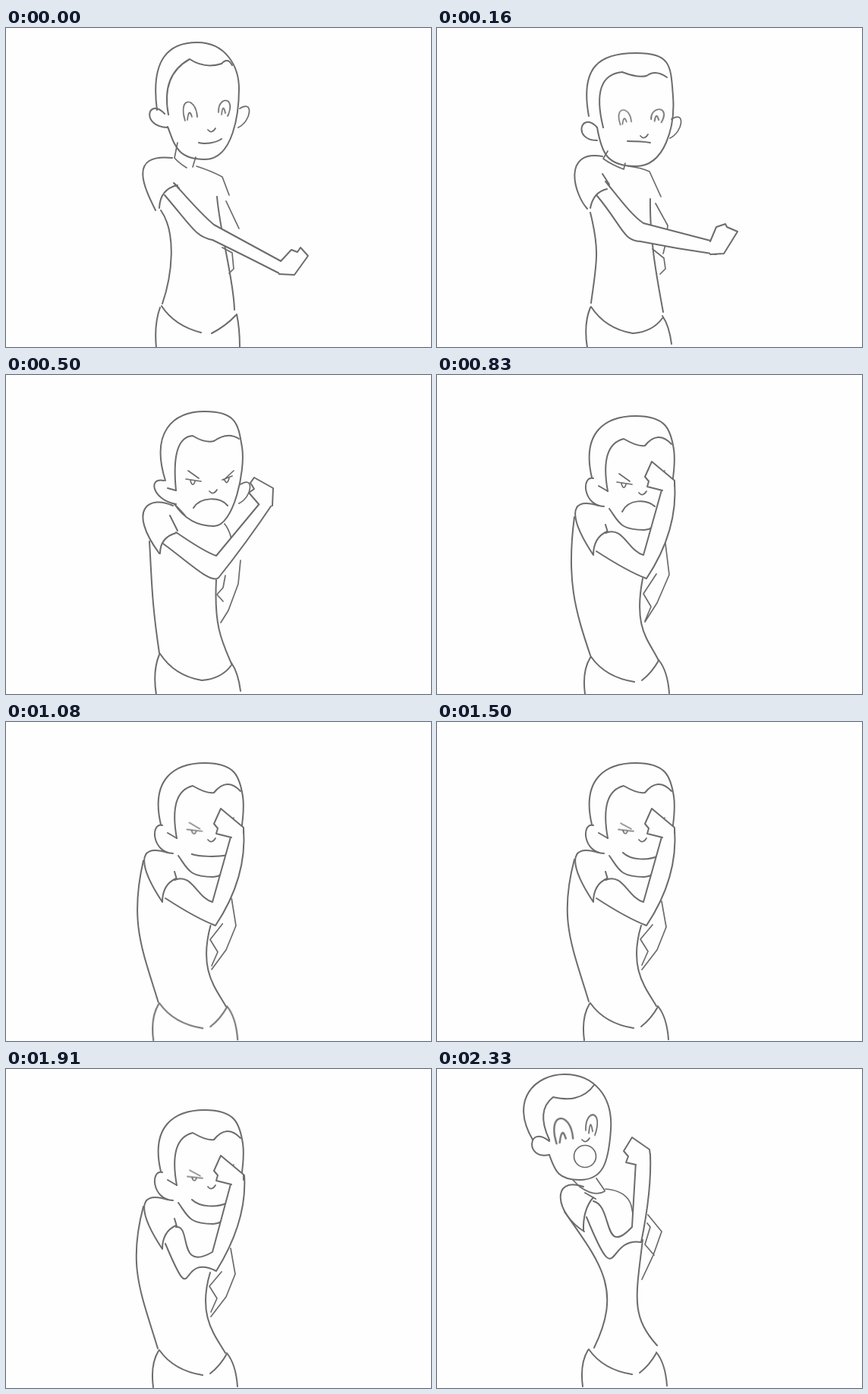
These frames come from a looping animation (560x420 px, 2750 ms). An HTML page without scripts:

```html
<!DOCTYPE html>
<html lang="en">
<head>
<meta charset="utf-8">
<title>Flexing boy</title>
<style>
html, body { margin: 0; width: 100%; height: 100%; overflow: hidden; background: #fefefe; }
svg { display: block; width: 560px; height: 420px; }
path, circle { fill: none; stroke: #6c6c6c; stroke-width: 2; stroke-linecap: round; stroke-linejoin: round; }
.move { animation: 2750ms steps(4) infinite; }
.thin, .thin path { stroke-width: 1.7; }
.solid { fill: #fefefe; }
.eye { transform-box: fill-box; transform-origin: center; }
#head { animation-name: head; }
#hair { animation-name: hair; }
#ear { animation-name: ear; }
#farEar { animation-name: farEar; }
#openL { animation-name: openL, openShow; }
#openR { animation-name: openR, openShow; }
#angryL { animation-name: angryL, angryShow; }
#angryR { animation-name: angryShow; }
#nose { animation-name: nose; }
#mouth { animation-name: mouth, mouthShow; }
#gasp { animation-name: gasp; }
#neck { animation-name: neck, neckShow; }
#sleeve { animation-name: sleeve; }
#torso { animation-name: torso; }
#hips { animation-name: hips; }
#back { animation-name: back; }
#arm { animation-name: arm; }
#fist { animation-name: fist; }

@keyframes head {
  0% { animation-timing-function: steps(2); d: path("M199 108C190 40 215 19 252 19S307 50 307 80S300 173 262 173S222 152 213 130"); }
  5.75% { d: path("M200 116C188 50 215 33 262 33S308 50 311 90S300 182 262 182S217 165 211 131"); }
  18.1% { d: path("M210 139C190 75 220 48 262 48S306 65 311 95S300 199 274 199S232 185 222 170"); }
  30.1%, 81.75% { animation-timing-function: steps(1, jump-both); d: path("M204 135C190 75 222 54 262 54S308 72 312 98S305 204 273 204S240 194 227 176"); }
  84.65%, to { d: path("M126 93C95 40 130 7 168 7S232 35 229 80S218 146 188 146S155 132 148 113"); }
}
@keyframes hair {
  0% { animation-timing-function: steps(2); d: path("M214 114Q204 62 242 41Q262 54 284 47Q292 38 298 49"); }
  5.75% { d: path("M219 131Q202 62 244 58Q265 66 276 63Q288 54 303 65"); }
  18.1% { d: path("M224 152Q217 82 246 80Q262 90 274 87Q292 74 307 84"); }
  30.1%, 81.75% { animation-timing-function: steps(1, jump-both); d: path("M225 153Q214 92 246 84Q265 95 274 93Q291 72 309 91"); }
  84.65%, to { d: path("M148 93Q130 55 153 37Q172 41 182 38Q198 34 207 21"); }
}
/* Near ear and sideburn */
@keyframes ear {
  0% { animation-timing-function: steps(2); d: path("M209 113C187 90 177 130 213 131M214 114L214 114"); }
  5.75% { d: path("M211 131C190 108 178 148 211 148M219 131L219 131"); }
  18.1% { d: path("M208 139C187 134 192 164 224 170M213 149L224 152"); }
  30.1%, 81.75% { animation-timing-function: steps(1, jump-both); d: path("M206 136C190 132 192 172 220 173M213 146L225 153"); }
  84.65%, to { d: path("M148 95C120 72 115 120 148 113M148 93L148 93"); }
}
@keyframes farEar {
  0% { animation-timing-function: steps(2); transform: none; }
  5.75% { transform: translate(1px, 14px); }
  18.1% { transform: translate(1px, 38px); opacity: 1; }
  22%, to { transform: translate(-6px, 42px); opacity: 0; }
}

@keyframes openL {
  0% { animation-timing-function: steps(2); transform: none; }
  5.75%, 81.75% { animation-timing-function: steps(1, jump-both); transform: translate(5px, 8px) scale(.9, .8); }
  84.65%, to { transform: translate(-76px, -28px) scale(1.35); }
}
@keyframes openR {
  0% { animation-timing-function: steps(2); transform: none; }
  5.75%, 81.75% { animation-timing-function: steps(1, jump-both); transform: translate(3px, 10px) scale(1.1, .85); }
  84.65%, to { transform: translate(-84px, -32px) scale(1, 1.3); }
}
@keyframes openShow {
  0%, 12% { opacity: 1; }
  12.01%, 81.74% { opacity: 0; }
  81.75%, to { opacity: 1; }
}
@keyframes angryL {
  0%, 18.1% { transform: none; }
  30.1% { transform: translate(0, 4px); }
  42.1%, to { transform: translate(2px, 5px) scale(1, .75); }
}
@keyframes angryShow {
  0%, 12% { opacity: 0; }
  12.01%, 81.74% { opacity: 1; }
  81.75%, to { opacity: 0; }
}
@keyframes nose {
  0% { animation-timing-function: steps(2); transform: none; }
  5.75% { transform: translate(2px, 8px); }
  18.1% { transform: translate(2px, 19px); }
  30.1%, 81.75% { animation-timing-function: steps(1, jump-both); transform: translate(0, 21px); }
  84.65%, to { transform: translate(-75px, -41px); }
}
@keyframes mouth {
  0% { animation-timing-function: steps(2); d: path("M254 151C262 153 275 152 284 146"); }
  5.75% { d: path("M251 149C262 149 270 149 281 151"); }
  18.1% { d: path("M247 175C256 160 282 160 292 172"); }
  30.1% { d: path("M244 180C252 163 276 163 287 173"); }
  42.1%, to { d: path("M245 172C255 182 278 183 292 176"); }
}
@keyframes mouthShow {
  0%, 81.75% { animation-timing-function: steps(1, jump-both); opacity: 1; }
  84.65%, to { opacity: 0; }
}
@keyframes gasp {
  0%, 81.75% { animation-timing-function: steps(1, jump-both); opacity: 0; transform: translate(38px, 25px); }
  84.65%, to { opacity: 1; transform: none; }
}

/* Neck, collar and far shoulder */
@keyframes neck {
  0% { animation-timing-function: steps(2); d: path("M226 151L222 171Q228 178 238 184M250 170L246 183M251 182Q270 188 285 196L294 220"); }
  5.75% { d: path("M225 162L219 172Q230 180 246 186M248 178L246 186M252 182Q270 184 280 189L295 222"); }
  18.1%, 81.75% { animation-timing-function: steps(1, jump-both); d: path("M222 170L228 176Q232 180 236 185M236 185L236 185M288 196Q293 202 296 212L297 218"); }
  84.65%, to { d: path("M179 146L188 155Q208 169 221 161M210 144L221 160M222 158Q250 160 256 180L258 190"); }
}
@keyframes neckShow {
  0%, 18.1% { opacity: 1; }
  30.1%, 81.75% { animation-timing-function: steps(1, jump-both); opacity: 0; }
  84.65%, to { opacity: 1; }
}
@keyframes sleeve {
  0% { animation-timing-function: steps(2); d: path("M219 171C160 165 182 210 197 240M202 237Q203 212 226 207M221 204L228 211"); }
  5.75% { d: path("M218 169C165 160 180 218 198 238M202 237Q206 216 224 212M218 192L227 206"); }
  18.1% { d: path("M220 172C190 158 158 175 202 235M203 235Q203 214 224 208M216 185L226 205"); }
  30.1%, 81.75% { animation-timing-function: steps(1, jump-both); d: path("M213 172C168 158 178 195 206 237M206 237Q206 214 224 206M222 197L225 207"); }
  84.65%, to { d: path("M193 155C150 140 155 190 194 214M193 213Q192 185 206 169M195 163L209 171"); }
}
@keyframes torso {
  0% { animation-timing-function: steps(2); d: path("M204 240C225 270 219 325 206 363M278 222C282 270 300 330 301 371"); }
  5.75% { d: path("M202 243C215 295 210 310 203 362M281 225C280 280 290 330 298 374"); }
  18.1% { d: path("M189 219C192 270 192 300 202 366M277 270C274 330 284 350 297 380"); }
  30.1% { d: path("M181 187C170 270 182 310 203 372M271 268C258 335 280 350 292 376"); }
  42.1%, 81.75% { animation-timing-function: steps(1, jump-both); d: path("M181 181C160 260 178 295 200 368M269 268C252 325 275 350 289 374"); }
  84.65%, to { d: path("M168 188C215 255 245 290 207 367M271 225C262 300 255 325 290 364"); }
}
@keyframes hips {
  0% { animation-timing-function: steps(2); d: path("M205 366Q222 392 257 401M271 402Q290 392 303 378M203 368Q195 390 198 421M304 377Q308 395 308 421"); }
  5.75%, 18.1% { d: path("M203 367Q222 396 258 402M258 402Q284 400 297 382M202 368Q193 390 198 421M297 379Q306 392 309 416"); }
  30.1%, to { d: path("M203 371Q222 398 260 404M270 402Q283 392 292 376M202 372Q191 390 195 420M292 375Q304 390 306 419"); }
  30.1% { transform: none; }
  42.1%, 81.75% { transform: translate(-1px, -1px); }
  84.65%, to { transform: translate(-3px, -2px); }
}
@keyframes back {
  0% { animation-timing-function: steps(2); d: path("M290 228L307 264L307 264L307 264M285 289L298 296L300 317L294 323"); }
  5.75% { d: path("M288 231L304 260L301 285L298 297M284 291L299 303L301 317L294 324"); }
  18.1% { d: path("M309 244L306 275L293 310L283 326M289 264L286 280L278 289L286 298"); }
  30.1% { d: path("M301 222L306 263L290 300L274 325M289 262L272 288L282 305L274 324"); }
  42.1%, 81.75% { animation-timing-function: steps(1, jump-both); d: path("M296 236L302 270L290 300L270 326M284 267L268 286L278 302L270 320"); }
  84.65%, to { d: path("M278 192L296 214L285 245L270 277M277 203L281 208L274 231L286 245"); }
}
@keyframes arm {
  0% { animation-timing-function: steps(2); d: path("M222 205C240 225 257 245 274 259L366 309L362 324Q315 300 272 279C250 275 245 262 209 220"); }
  5.75% { d: path("M222 202C240 224 256 246 272 257L368 282L368 298Q318 291 268 281C245 280 245 262 211 221"); }
  18.1% { d: path("M224 207C240 218 262 233 277 238L336 167L351 170Q316 222 280 267C270 275 245 250 207 222"); }
  30.1%, 54.45% { animation-timing-function: steps(5); d: path("M222 208C245 198 252 232 272 237L297 148L313 140Q318 205 276 268C255 260 230 245 210 232"); }
  69.4%, 81.75% { animation-timing-function: steps(1, jump-both); d: path("M224 208C245 205 225 268 272 241L297 148L314 140Q318 200 277 266C225 240 250 325 210 230"); }
  84.65%, to { d: path("M206 174C232 180 218 250 257 208L262 122L281 112Q283 160 269 228C222 220 240 300 197 195"); }
}
@keyframes fist {
  0% { animation-timing-function: steps(2); d: path("M362 307L376 292L384 295L388 289L398 300L380 325L360 324"); }
  5.75% { d: path("M360 281L368 262L380 258L382 262L396 268L378 297L360 298"); }
  18.1% { d: path("M333 170L320 155L327 150L322 142L327 135L352 149L351 172"); }
  30.1%, 81.75% { animation-timing-function: steps(1, jump-both); d: path("M297 152L277 147L279 140L274 134L283 114L313 139L313 146"); }
  84.65%, to { d: path("M262 126L249 123L252 115L246 108L257 90L280 106L281 114"); }
}
</style>
</head>
<body>
<svg viewBox="0 0 560 420">
  <path id="back" class="move thin"/>
  <path id="torso" class="move"/>
  <path id="hips" class="move"/>
  <path id="neck" class="move thin"/>
  <path id="ear" class="move"/>
  <path id="farEar" class="move thin" d="M308 106C326 94 324 122 306 131"/>
  <path id="head" class="move"/>
  <path id="hair" class="move"/>
  <g id="openL" class="move thin eye">
    <path d="M236 122C226 90 250 90 252 117M239 121Q241 104 245 117"/>
  </g>
  <g id="openR" class="move thin eye">
    <path d="M280 111C279 89 304 90 292 116M284 114Q286 98 289 112"/>
  </g>
  <g id="angryL" class="move thin eye">
    <path d="M240 126L254 136M237 137L257 140M243 139Q246 149 249 140"/>
  </g>
  <g id="angryR" class="move thin eye">
    <path d="M300 126L287 138M285 138L298 133M288 138Q291 146 294 136"/>
  </g>
  <path id="nose" class="move thin" d="M266 134Q271 140 276 132"/>
  <path id="mouth" class="move"/>
  <circle id="gasp" class="move thin" cx="195" cy="115" r="14.5"/>
  <path id="arm" class="move solid"/>
  <path id="fist" class="move solid"/>
  <path id="sleeve" class="move"/>
</svg>
</body>
</html>
```
